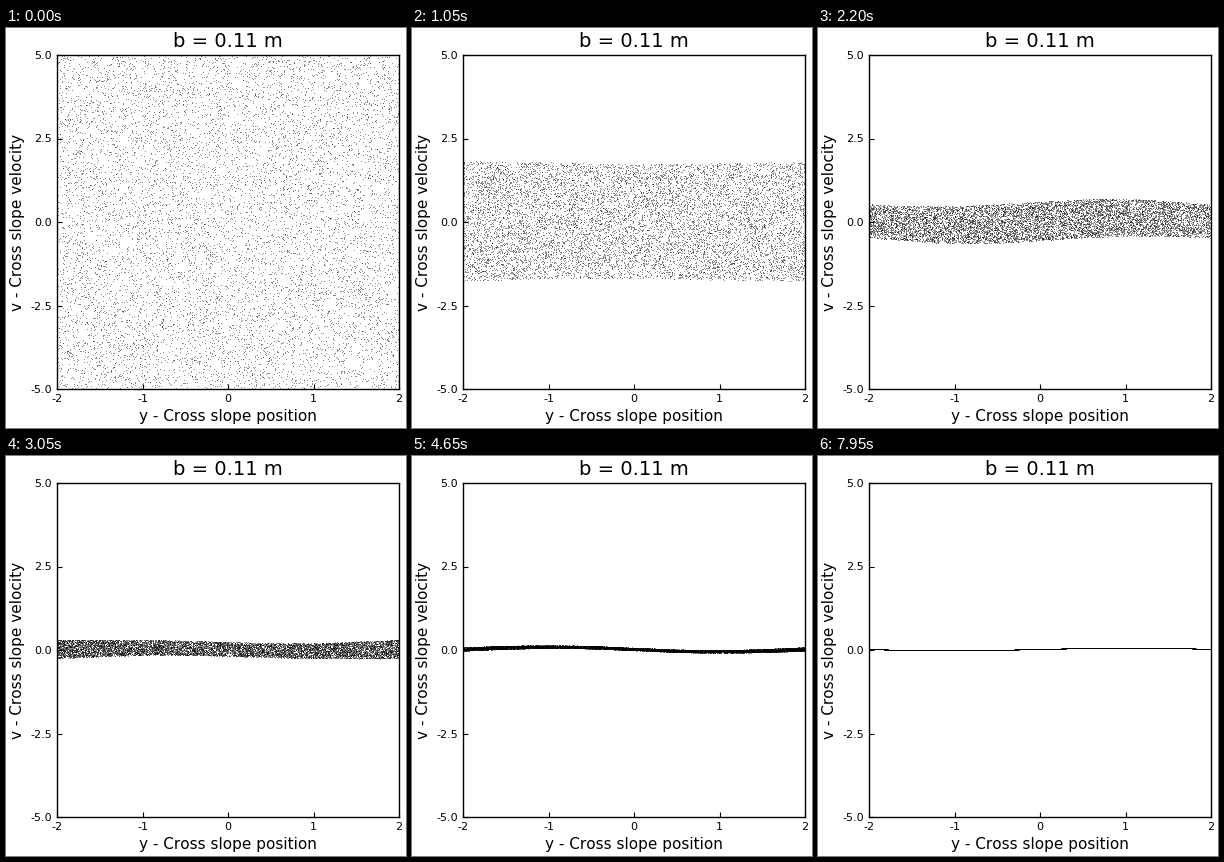
These frames come from a looping animation (400x400 px, 8 s). A matplotlib script:

```python
import numpy as np
import matplotlib.pyplot as plt
from matplotlib.animation import FuncAnimation

plt.rcParams.update({
    "font.family": "DejaVu Sans",
    "axes.unicode_minus": False,
    "axes.linewidth": 1,
    "text.kerning_factor": 6,
})

SIZE, DPI = 400, 100
FRAMES, INTERVAL = 160, 50
COUNT = 10000

# Sleds on a bumpy slope: drag, steady downhill speed, bumps across the slope
DRAG, SPEED = 0.5, 3.5
PUSH = 0.162
P, Q = 2 * np.pi / 10, 2 * np.pi / 4
DT, SUBSTEPS = 0.1, 4


def slope(t, y, v):
    return v, -DRAG * v - PUSH * np.cos(P * SPEED * t) * np.sin(Q * y)


def rk4(t, y, v, h):
    a1, b1 = slope(t, y, v)
    a2, b2 = slope(t + h / 2, y + h / 2 * a1, v + h / 2 * b1)
    a3, b3 = slope(t + h / 2, y + h / 2 * a2, v + h / 2 * b2)
    a4, b4 = slope(t + h, y + h * a3, v + h * b3)
    return (y + h / 6 * (a1 + 2 * a2 + 2 * a3 + a4),
            v + h / 6 * (b1 + 2 * b2 + 2 * b3 + b4))


def simulate():
    rng = np.random.default_rng(11)
    y = rng.uniform(-2, 2, COUNT)
    v = rng.uniform(-5, 5, COUNT)
    h = DT / SUBSTEPS
    states = []
    for frame in range(FRAMES):
        states.append(((y + 2) % 4 - 2, v))
        for k in range(SUBSTEPS):
            y, v = rk4(frame * DT + k * h, y, v, h)
    return states


states = simulate()

fig = plt.figure(figsize=(SIZE / DPI, SIZE / DPI), dpi=DPI, facecolor="white")
left, right, bottom, top = 51, 393, 39, 373
ax = fig.add_axes([left / SIZE, bottom / SIZE,
                   (right - left) / SIZE, (top - bottom) / SIZE])
ax.set_xlim(-2, 2)
ax.set_ylim(-5, 5)
ax.set_xticks(range(-2, 3))
ax.set_yticks(np.linspace(-5, 5, 5))
ax.tick_params(direction="in", labelsize=8, length=3.5, width=0.8, pad=3.5)
ax.set_title("b = 0.11 m", fontsize=14)
ax.set_xlabel("y - Cross slope position", fontsize=11)
ax.set_ylabel("v - Cross slope velocity", fontsize=11)

dots, = ax.plot([], [], ",", color="black", alpha=0.45)


def update(frame):
    dots.set_data(*states[frame])
    return dots,


anim = FuncAnimation(fig, update, frames=FRAMES, interval=INTERVAL,
                     repeat=True, repeat_delay=0)
plt.show()
```
